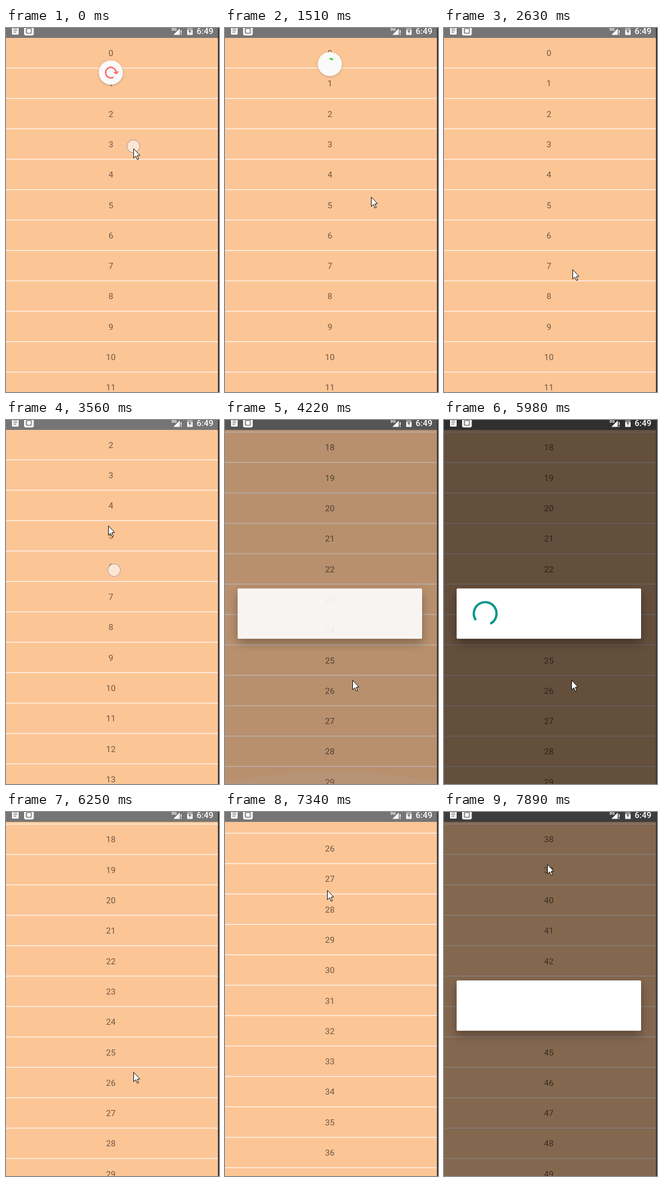
These frames come from a looping animation (388x662 px, 8 s). An HTML page with a canvas:

```html
<!DOCTYPE html>
<html lang="en">
<head>
<meta charset="utf-8">
<title>Pull to refresh list</title>
<style>
  html, body { margin: 0; width: 100%; height: 100%; overflow: hidden; background: #fcc596; }
  canvas { display: block; }
</style>
</head>
<body>
<canvas id="stage" width="388" height="662"></canvas>
<script>
const ctx = document.getElementById('stage').getContext('2d');
const LOOP = 8000, STEP = 135.8;
const W = 386, H = 662, MID = 191, BAR = 18, ROW = 55.3;
const PAGE = 30, MORE = 20;               // rows at first, rows per load
const GRAY = '#757575';

// Key points of the pointer: time, x, y
const PATH = [
  [-70, 232, 215], [700, 233, 259], [1130, 234, 311], [1494, 266, 307], [2250, 248, 324],
  [2800, 225, 515], [3357, 213, 393], [3531, 186, 192], [4150, 232, 473], [6560, 232, 473],
  [7000, 215, 505], [7290, 186, 150], [7600, 188, 95]
];
const TOUCH_LAG = 70;
const PULL = { release: 540, settled: 722, spin: 1388, hide: 2330, from: 41, reach: 70.4, rest: 65.5 };
const FLINGS = [
  { press: 3380, release: 3620, end: 4040, y: 384.1 },
  { press: 7060, release: 7290, end: 7590, y: 496 }
];
const DIALOGS = [{ open: 4140, close: 6075 }, { open: 7753, close: LOOP + 1000 }];

const clamp = (v, a = 0, b = 1) => Math.min(b, Math.max(a, v));
const lerp = (a, b, p) => a + (b - a) * p;
const span = (t, a, b) => clamp((t - a) / (b - a));
const rad = d => d * Math.PI / 180;

// cubic-bezier(.4, 0, .2, 1)
function ease(x) {
  let lo = 0, hi = 1;
  for (let i = 0; i < 20; i++) {
    const u = (lo + hi) / 2, v = 1 - u;
    if (1.2 * v * v * u + .6 * v * u * u + u * u * u < x) lo = u; else hi = u;
  }
  return lo * lo * (3 - 2 * lo);
}

function pointer(t) {
  let i = 0;
  while (i < PATH.length - 2 && PATH[i + 1][0] < t) i++;
  const [ta, xa, ya] = PATH[i], [tb, xb, yb] = PATH[i + 1], p = span(t, ta, tb);
  return { x: lerp(xa, xb, p), y: lerp(ya, yb, p) };
}
const touch = t => pointer(t - TOUCH_LAG);

const bottom = loads => loads ? (PAGE + MORE * (loads - 1)) * ROW - H - 6 : 0;

function scrollAt(t) {
  let pos = 0;
  FLINGS.forEach((f, i) => {
    if (t < f.press) return;
    const drag = Math.max(0, f.y - touch(Math.min(t, f.release)).y);
    const p = span(t, f.release, f.end);
    pos = lerp(bottom(i) + drag, bottom(i + 1), 1 - (1 - p) ** 1.4);
  });
  return pos;
}

function roundBox(x, y, w, h, r, fill) {
  ctx.fillStyle = fill;
  ctx.beginPath();
  ctx.roundRect(x, y, w, h, r);
  ctx.fill();
}

function disc(x, y, r, fill) {
  ctx.fillStyle = fill;
  ctx.beginPath();
  ctx.arc(x, y, r, 0, 2 * Math.PI);
  ctx.fill();
}

function polygon(fill, ...pts) {
  ctx.fillStyle = fill;
  ctx.beginPath();
  for (let i = 0; i < pts.length; i += 2) ctx.lineTo(pts[i], pts[i + 1]);
  ctx.closePath();
  ctx.fill();
}

function arc(x, y, r, from, sweep, color, width) {
  ctx.strokeStyle = color;
  ctx.lineWidth = width;
  ctx.lineCap = 'square';
  ctx.beginPath();
  ctx.arc(x, y, r, rad(from), rad(from + Math.max(sweep, .5)));
  ctx.stroke();
}

function shadow(blur, dy, alpha) {
  ctx.shadowColor = `rgba(0,0,0,${alpha})`;
  ctx.shadowBlur = blur;
  ctx.shadowOffsetY = dy;
}

function drawList(t) {
  const pos = scrollAt(t), first = Math.max(0, Math.floor(pos / ROW) - 1);
  ctx.fillStyle = '#fcc596';
  ctx.fillRect(0, 0, W, H);
  ctx.font = '15.4px Roboto, sans-serif';
  ctx.textAlign = 'center';
  for (let i = first; i < first + 15; i++) {
    const y = i * ROW - pos;
    ctx.fillStyle = 'rgba(0,0,0,.56)';
    ctx.fillText(i, MID, y + 51);
    ctx.fillStyle = '#fff';
    ctx.fillRect(0, y + 72.2, W, 1.2);
  }
  for (const f of FLINGS) drawGlow(t - f.end);
}

function drawGlow(age) {
  if (age <= 0 || age >= 290) return;
  const p = 1 - age / 290, r = 1010;
  disc(MID, H - 53 * p + r, r, `rgba(255,255,255,${.25 * p})`);
}

function pullState(y) {
  const extra = (y - PULL.from) / 2 - PULL.reach;
  const q = clamp(extra / PULL.reach, 0, 2) / 4, tension = (q - q * q) * 2;
  return { y: PULL.rest + PULL.reach * tension * 2, turn: (.15 + tension * 2) / 2 };
}

function drawRefresh(t) {
  const scale = 1 - span(t, PULL.hide, PULL.hide + 150);
  if (!scale) return;
  const pull = pullState(touch(Math.min(t, PULL.release)).y);
  const back = span(t, PULL.release, PULL.settled);
  ctx.save();
  ctx.translate(MID, lerp(pull.y, PULL.rest, 1 - (1 - back) ** 2));
  ctx.scale(scale, scale);
  ctx.save();
  shadow(4, 1.2, .22);
  disc(0, 0, 22, '#fafafa');
  ctx.restore();
  if (t < PULL.spin) {
    const p = span(t, PULL.settled, PULL.spin);
    const turn = 360 * lerp(pull.turn, 1, p), tail = 288 * p;
    arc(0, 0, 9.6, turn + tail, 288 - tail, '#ff6b6b', 2.75);
    ctx.rotate(rad(turn + 283));
    polygon('#ff6b6b', 4.1, 0, 15.1, 0, 9.6, 5.5);
  } else {
    const p = (t - PULL.spin) / 1332;
    const tail = 288 * ease(clamp(2 * p - 1)), head = 288 * ease(clamp(2 * p));
    arc(0, 0, 9.6, -103 + 234 * p + tail, head - tail, '#1fd01f', 2.75);
  }
  ctx.restore();
}

function drawTouch(t) {
  const down = t < PULL.release || FLINGS.some(f => t >= f.press && t < f.release);
  if (!down) return;
  const { x, y } = touch(t);
  disc(x, y, 13.8, 'rgba(255,225,225,.25)');
  disc(x, y, 12.4, 'rgba(150,130,145,.5)');
  disc(x, y, 10.8, '#fde6d3');
}

function dialogPath(inverse) {
  ctx.beginPath();
  if (inverse) ctx.rect(0, 0, W, H);
  ctx.roundRect(23, 306.5, 336, 91.3, 2);
}

function drawDialog(t) {
  for (const { open, close } of DIALOGS) {
    const p = Math.min(span(t, open, open + 155), 1 - span(t, close, close + 140));
    if (!p) continue;
    ctx.fillStyle = `rgba(0,0,0,${.6 * p})`;
    ctx.fillRect(0, 0, W, H);
    ctx.save();
    ctx.globalAlpha = Math.min(1, 2 * p);
    ctx.fillStyle = '#fff';
    ctx.save();
    dialogPath(true);
    ctx.clip('evenodd');
    shadow(17, 8, .34);
    dialogPath();
    ctx.fill();
    ctx.restore();
    dialogPath();
    ctx.fill();
    const n = (t - open - 130) / 1193;
    if (n > 0) {
      const k = n % 1;
      const tail = 270 * ease(clamp(2 * k - 1)), head = 270 * ease(clamp(2 * k));
      arc(75, 352, 20.7, -94 + 144 * n + 90 * k + tail, head - tail, '#009688', 4.2);
    }
    ctx.restore();
  }
}

function drawStatus() {
  roundBox(11, -2, 12, 14, 1.5, '#fff');
  ctx.fillStyle = GRAY;
  for (let i = 0; i < 3; i++) ctx.fillRect(13.5, 1 + 3 * i, i < 2 ? 7 : 5, 1.3);

  roundBox(33, -6, 17.5, 19.5, 3, '#fff');
  ctx.strokeStyle = GRAY;
  ctx.lineWidth = 1.5;
  ctx.strokeRect(37.5, 1, 8.5, 8.5);
  ctx.fillStyle = GRAY;
  for (const y of [2.5, 6.5]) ctx.fillRect(35.5, y, 2, 1.5);

  polygon('#fff', 305, 12.5, 316.5, 1, 316.5, 12.5);
  ctx.fillRect(318.3, 4, 1.6, 5.5);
  ctx.fillRect(318.3, 11, 1.6, 1.6);
  ctx.textAlign = 'left';
  ctx.font = 'bold 8px Roboto, sans-serif';
  ctx.fillText('3G', 301, 4.5);

  roundBox(330, -1, 10, 13.5, 1, 'rgba(255,255,255,.4)');
  roundBox(330, 4, 10, 8.5, 1, '#fff');
  polygon(GRAY, 336, 1, 332, 7, 334.7, 7, 334, 11.5, 338, 5.3, 335.4, 5.3);
  ctx.fillStyle = '#fff';
  ctx.font = '500 15.4px Roboto, sans-serif';
  ctx.fillText('6:49', 347.3, 11);
}

function drawPointer(t) {
  const { x, y } = pointer(t);
  ctx.save();
  ctx.translate(Math.round(x) + .5, Math.round(y) + .5);
  polygon('#fff', 0, 0, 0, 17, 4, 13.4, 6.7, 19.8, 9.2, 18.8, 6.5, 12.6, 11.3, 12);
  ctx.strokeStyle = '#000';
  ctx.lineWidth = 1;
  ctx.stroke();
  ctx.restore();
}

function draw(t) {
  drawList(t);
  drawRefresh(t);
  ctx.fillStyle = GRAY;
  ctx.fillRect(0, 0, W, BAR);
  drawDialog(t);
  drawStatus();
  ctx.fillStyle = '#333';
  ctx.fillRect(W, 0, 2, H);
  drawTouch(t);
  drawPointer(t);
}

const begin = performance.now();
function tick() {
  const t = (performance.now() - begin) % LOOP;
  draw(Math.floor(t / STEP) * STEP);
  requestAnimationFrame(tick);
}
tick();
</script>
</body>
</html>
```
